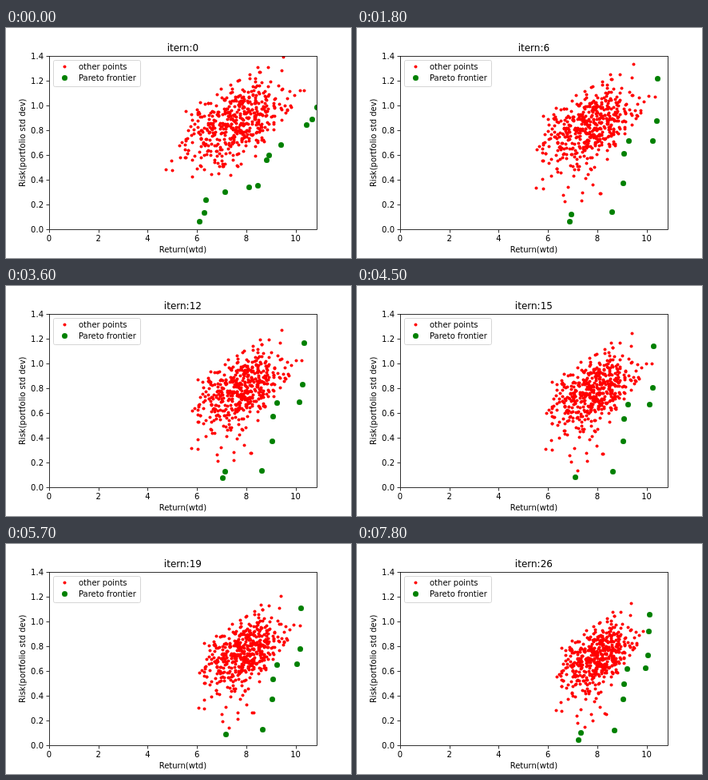
An HTML page with a canvas for the animation above (8 s loop, 432 px wide and 288 px high).

```html
<!DOCTYPE html>
<html lang="en">
<head>
<meta charset="utf-8">
<title>Pareto frontier</title>
<style>
html, body { margin: 0; width: 100%; height: 100%; overflow: hidden; background: #fff; }
canvas, svg { position: absolute; left: 0; top: 0; width: 432px; height: 288px; }
text { font: 10px "DejaVu Sans", Verdana, sans-serif; fill: #000; }
#title { font-size: 12px; }
</style>
</head>
<body>
<canvas id="plot" width="432" height="288"></canvas>
<svg viewBox="0 0 432 288">
  <g id="axes" fill="none" stroke="#000" stroke-width="0.8">
    <rect x="54.5" y="35.5" width="335" height="217"/>
  </g>
  <text id="title" x="221.4" y="29" text-anchor="middle">itern:0</text>
  <text x="221.4" y="281" text-anchor="middle">Return(wtd)</text>
  <text transform="translate(24 143.8) rotate(-90)" text-anchor="middle">Risk(portfolio std dev)</text>
  <rect x="59.5" y="40.5" width="109" height="33" rx="2" fill="#fff" stroke="#d6d6d6"/>
  <circle cx="73.5" cy="48.5" r="2" fill="#f00"/>
  <circle cx="73.5" cy="62.5" r="3.5" fill="#008000"/>
  <text x="91" y="52">other points</text>
  <text x="91" y="66">Pareto frontier</text>
</svg>
<script>
const LOOP = 8000, STEP = 300, MID = 6, LAST = 26;
const BEST = 9.05;           // return that the swarm contracts towards
const px = x => 54 + x * 30.86;
const py = y => 252 - y * 155.3;
const mix = (a, b, p) => a + (b - a) * p;
const shrink = i => Math.pow(0.987, i - MID);

// Each track holds [return, risk] at iterations 0, MID and LAST
const edge = [
  [[6.1, .064], [6.87, .064], [7.32, .1]],
  [[6.3, .135], [6.95, .122], [7.47, .15]],
  [[6.35, .24], [6.67, .225], [7.2, .18]],
  [[7.12, .3], [7.35, .23], [7.8, .2]],
  [[8.1, .34], [8.1, .29], [8.3, .255]],
  [[8.46, .355], [8.58, .14], [8.68, .12]],
  [[8.8, .56], [9.03, .373], [9.03, .373]],
  [[8.91, .6], [9.07, .612], [9.07, .495]],
  [[9.4, .683], [9.27, .714], [9.2, .618]],
  [[10.43, .843], [10.24, .717], [9.95, .625]],
  [[10.66, .89], [10.4, .877], [10.05, .73]],
  [[10.33, 1.12], [10.33, 1.07], [10.08, .92]],
  [[10.85, .985], [10.44, 1.217], [10.1, 1.057]],
  [[7, -.3], [7.05, -.2], [7.24, .045]]
];

let seed = 20;
function rand() {
  seed = (seed + 0x6d2b79f5) | 0;
  let t = Math.imul(seed ^ (seed >>> 15), 1 | seed);
  t = (t + Math.imul(t ^ (t >>> 7), 61 | t)) ^ t;
  return ((t ^ (t >>> 14)) >>> 0) / 4294967296;
}
function gauss(limit) {
  for (;;) {
    const g = Math.sqrt(-2 * Math.log(1 - rand())) * Math.cos(2 * Math.PI * rand());
    if (Math.abs(g) < limit) return g;
  }
}

const spread = (x, y, kx, ky) => [mix(BEST, x, kx), y * ky];
const settle = (x, y) => spread(x, y, 0.77, 0.86);

const cloud = [];
while (cloud.length < 470) {
  const x = 7.8 + 0.98 * gauss(2.6);
  const y = 0.84 + 0.08 * (x - 7.8) + 0.143 * gauss(2.7);
  const floor = Math.max(0.4, 0.45 + 0.27 * (x - 8));
  if (x < 10.2 && y > floor) cloud.push([spread(x, y, 1.08, 1.046), [x, y], settle(x, y)]);
}
// A few strays below the cloud
for (let n = 0; n < 12; n++) {
  const x = 5.5 + 2.7 * rand(), y = 0.27 + 0.2 * rand();
  cloud.push([[x - 0.8, y + 0.15], [x, y], settle(x, y)]);
}

function place([start, mid, end], i) {
  const early = i < MID;
  const p = early ? i / MID : (1 - shrink(i)) / (1 - shrink(LAST));
  const [a, b] = early ? [start, mid] : [mid, end];
  return [mix(a[0], b[0], p), mix(a[1], b[1], p)];
}

const ctx = document.getElementById("plot").getContext("2d");
const title = document.getElementById("title");

function dots(points, r, color) {
  ctx.fillStyle = color;
  for (const [x, y] of points) {
    ctx.beginPath();
    ctx.arc(Math.round(px(x)) + 0.5, Math.round(py(y)) + 0.5, r, 0, 2 * Math.PI);
    ctx.fill();
  }
}

function draw(i) {
  const rim = edge.map(t => place(t, i)).filter(p => p[1] > 0);
  // On the frontier: nothing else has more return at less risk
  const isBest = a => !rim.some(b => b !== a && b[0] >= a[0] && b[1] <= a[1]);
  ctx.clearRect(0, 0, 432, 288);
  ctx.save();
  ctx.beginPath();
  ctx.rect(54, 35, 335, 218);
  ctx.clip();
  dots(cloud.map(t => place(t, i)), 2, "#f00");
  dots(rim.filter(p => !isBest(p)), 2, "#f00");
  dots(rim.filter(isBest), 3.5, "#008000");
  ctx.restore();
  title.textContent = "itern:" + i;
}

function add(parent, tag, attrs, text) {
  const el = document.createElementNS("http://www.w3.org/2000/svg", tag);
  for (const name in attrs) el.setAttribute(name, attrs[name]);
  if (text) el.textContent = text;
  parent.appendChild(el);
}
const axes = document.getElementById("axes"), svg = axes.parentNode;
for (let v = 0; v <= 10; v += 2) {
  const x = Math.round(px(v));
  add(axes, "path", { d: `M${x + 0.5} 253v3.5` });
  add(svg, "text", { x: px(v), y: 267, "text-anchor": "middle" }, String(v));
}
for (let n = 0; n <= 7; n++) {
  const y = Math.round(py(n / 5));
  add(axes, "path", { d: `M54 ${y + 0.5}h-3.5` });
  add(svg, "text", { x: 47, y: y + 4, "text-anchor": "end" }, (n / 5).toFixed(1));
}

let shown = -1;
function tick() {
  const i = Math.min(LAST, Math.floor((performance.now() % LOOP) / STEP));
  if (i !== shown) draw(shown = i);
  requestAnimationFrame(tick);
}
tick();
</script>
</body>
</html>
```
